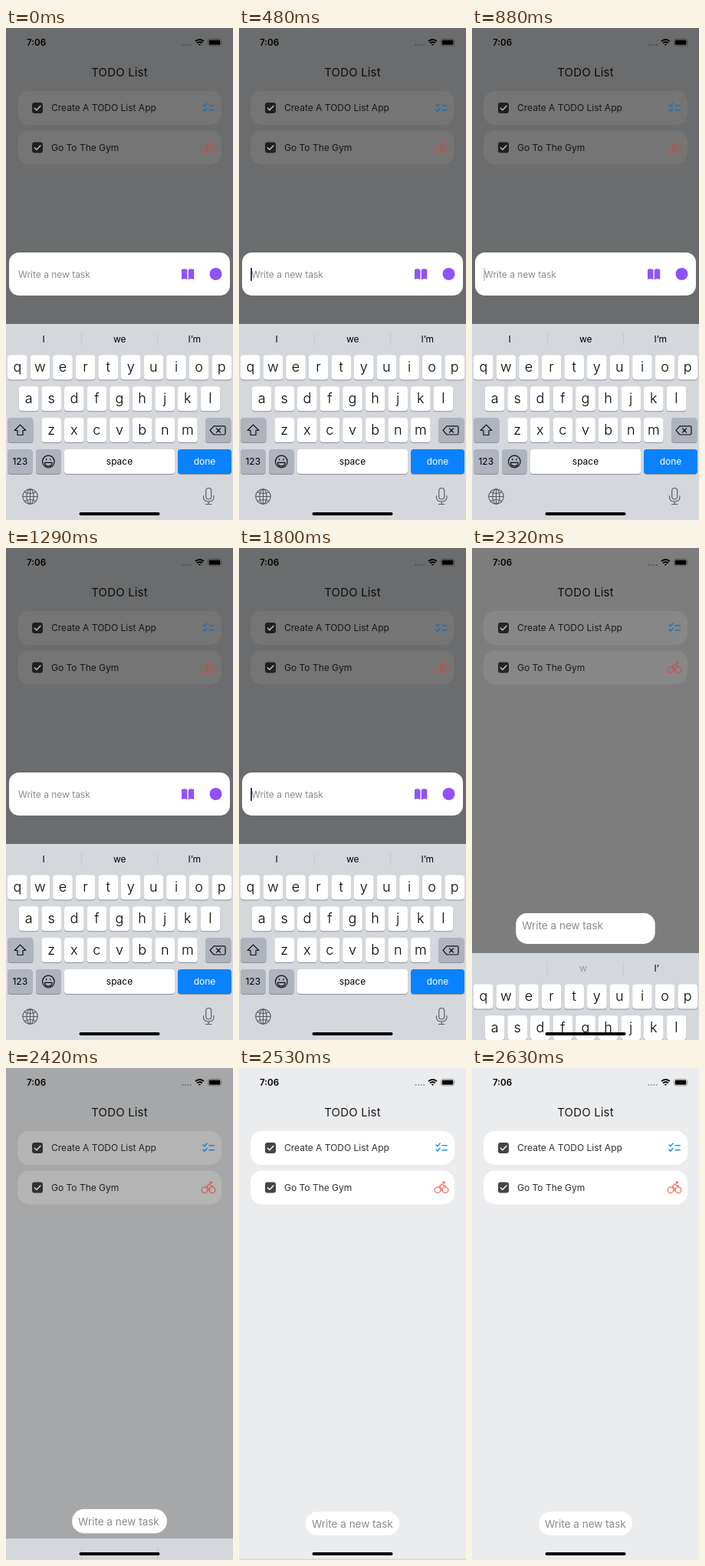
Recreate the animation shown at these times as an HTML page. Size 296 by 640 pixels, loop 2.84 s.

```html
<!DOCTYPE html>
<html lang="en">
<head>
<meta charset="utf-8">
<title>TODO List</title>
<style>
  html, body { margin: 0; width: 100%; height: 100%; overflow: hidden; background: #ebecee; }
  svg { display: block; width: 100%; height: 100%; font-family: Inter, Roboto, sans-serif; }
  .line { fill: none; stroke-linecap: round; stroke-linejoin: round; }
  .middle { text-anchor: middle; }
  .label { font-size: 12px; }
  .letter { font-size: 18px; font-weight: 300; text-anchor: middle; }
</style>
</head>
<body>
<svg viewBox="0 0 296 640">
  <rect width="296" height="640" fill="#ebecee"/>

  <!-- Status bar -->
  <text x="27" y="23" font-size="11.6" font-weight="600">7:06</text>
  <g fill="#000" fill-opacity=".35">
    <circle cx="230.5" cy="22" r="1"/><circle cx="234" cy="22" r="1"/>
    <circle cx="237.5" cy="22" r="1"/><circle cx="241" cy="22" r="1"/>
  </g>
  <g class="line" stroke="#000" stroke-width="1.8" style="stroke-linecap:butt">
    <path d="M247 17.3q5.4-4.6 10.8 0M249 19.6q3.4-2.8 6.8 0"/>
  </g>
  <path d="M250.7 21.3q1.7-1.3 3.4 0l-1.7 1.8z"/>
  <rect x="263.5" y="14.5" width="17" height="8.5" rx="2.4" fill="none" stroke="#000" stroke-opacity=".4" stroke-width=".8"/>
  <rect x="264.8" y="15.8" width="14.4" height="5.9" rx="1.3"/>
  <path d="M281.6 17.2q1.3 1.5 0 3z" fill-opacity=".45"/>

  <!-- Task list -->
  <text class="middle" x="148" y="62.5" font-size="15" letter-spacing=".15" fill="#1c1c1c">TODO List</text>
  <g fill="#fff">
    <rect x="15" y="82" width="266" height="44" rx="15"/>
    <rect x="15" y="133.5" width="266" height="44" rx="15"/>
  </g>
  <g class="label" fill="#303030">
    <text x="59" y="108.3">Create A TODO List App</text>
    <text x="59" y="159.8">Go To The Gym</text>
  </g>
  <g fill="#454547">
    <rect x="34" y="97" width="14" height="14" rx="3.2"/>
    <rect x="34" y="148.5" width="14" height="14" rx="3.2"/>
  </g>

  <rect id="barrier" width="296" height="640"/>

  <g id="icons" class="line">
    <path d="M37.3 104.2l2.6 2.6 5-5.4M37.3 155.7l2.6 2.6 5-5.4" stroke="#fff" stroke-width="1.4"/>
    <path d="M257 100l1.8 1.8 3.2-3.6M257 106.300l1.800 1.800 3.200-3.600M265 100.700h6.200M265 106.800h6.200" stroke="#2196f3" stroke-width="1.6"/>
    <g stroke="#f56e5f" stroke-width="1.3">
      <circle cx="258.900" cy="158.700" r="3.800"/><circle cx="269" cy="158.700" r="3.800"/>
      <path d="M264.200 159.500v-3.300l-2.800-2.200 3.200-3 2.300 2.300h2.800"/>
      <circle cx="267.200" cy="149" r="1.100" fill="#f56e5f"/>
    </g>
  </g>

  <!-- Task entry -->
  <rect id="box" fill="#fff"/>
  <text id="hint" fill="#8a8a8a">Write a new task</text>
  <g id="actions" fill="#9052fa">
    <path d="M229 314.200q4-1.800 7.400.2v13q-3.400-2-7.400-.4zM245.200 314.200q-4-1.800-7.400.2v13q3.400-2 7.400-.4z"/>
    <circle cx="273.500" cy="320" r="8"/>
  </g>
  <rect id="cursor" x="15.300" y="312" width="1.500" height="17"/>

  <g id="keyboard">
    <rect y="385" width="296" height="256" fill="#d4d8dd"/>
    <path d="M98.500 397v16M197.500 397v16" stroke="#c0c4c9" stroke-width=".8"/>
    <g id="suggestions" class="label">
      <text x="47.600" y="409.300">I</text><text x="140" y="409.300">we</text><text x="237.500" y="409.300">I’m</text>
    </g>
    <g id="keys"></g>
    <g class="line" stroke="#111" stroke-width="1.200">
      <path d="M18.500 516.200l-7.300 7.300h3.800v6h7v-6h3.800z"/>
      <path d="M271 517.800h13.200q1.800 0 1.800 1.800v7.600q0 1.800-1.800 1.800H271l-5-5.600zM274.500 521l5 5m0-5l-5 5"/>
      <circle cx="55.300" cy="564" r="7.800"/>
      <path d="M50.300 565.300h10q-.7 4.600-5 4.600t-5-4.600zM52.600 560.500v1.400M58 560.500v1.400"/>
    </g>
    <g class="line" stroke="#565a60" stroke-width="1.100">
      <circle cx="31.500" cy="609.500" r="9.700"/><ellipse cx="31.500" cy="609.500" rx="4.600" ry="9.700"/>
      <path d="M31.500 600v19M22 609.500h19M24 603.500q7.500 4 15 0M24 615.500q7.500-4 15 0"/>
      <rect x="260.700" y="598.500" width="7" height="14.500" rx="3.500"/>
      <path d="M257.500 608.500v2q0 5.500 6.700 5.500t6.700-5.500v-2M264.200 616v3.500M260.500 619.500h7.400"/>
    </g>
  </g>
  <rect x="95.500" y="630" width="105" height="4" rx="2"/>
</svg>
<script>
const $ = id => document.getElementById(id);

// Keyboard layout
function key(x, y, width, label, { fill = '#fff', color = '#000', style = 'label middle', base = 20 } = {}) {
  const rect = (top, color) => `<rect x="${x}" y="${top}" width="${width}" height="32" rx="4" fill="${color}"/>`;
  return rect(y + 1, '#8e9196') + rect(y, fill) +
    `<text class="${style}" x="${x + width / 2}" y="${y + base}" fill="${color}">${label}</text>`;
}
const pitch = 296 / 10, grey = { fill: '#aeb3bd' };
let keys = '';
['qwertyuiop', 'asdfghjkl', 'zxcvbnm'].forEach((row, r) => {
  const indent = [2, pitch / 2 + 2, pitch * 1.5 + 2][r];
  [...row].forEach((char, i) => {
    keys += key(indent + i * pitch, 425.5 + r * 40.8, 25.6, char, { style: 'letter', base: 21.5 });
  });
});
keys += key(2, 507.1, 33.5, '', grey) + key(260, 507.1, 33.5, '', grey) +
  key(2, 548, 32.5, '123', grey) + key(39, 548, 32.5, '', grey) + key(76, 548, 144, 'space') +
  key(224, 548, 70, 'done', { fill: '#0a82ff', color: '#fff' });
$('keys').innerHTML = keys;

// Timing, in ms: the picture is refreshed only at these moments
const LOOP = 2840, CLOSE = 2200;
const refreshes = [0, 260, 370, 480, 780, 880, 980, 1290, 1400, 1500, 1800, 1910, 2010,
  2200, 2320, 2420, 2530, 2630];

const clamp = v => Math.max(0, Math.min(1, v));
const mix = (a, b, p) => a + (b - a) * p;
const settle = (t, scale, power) => 1 - Math.exp(-((t / scale) ** power));
const easeOut = v => 1 - (1 - clamp(v)) ** 2;

function cursorOpacity(t) {
  const phase = (t - 260 + 1030) % 1030;
  return phase < 510 ? easeOut(phase / 230) : 1 - easeOut((phase - 510) / 230);
}

function set(id, attributes) {
  for (const name in attributes) $(id).setAttribute(name, attributes[name]);
}

function draw(time) {
  const t = refreshes.findLast(moment => moment <= time);
  const closing = Math.max(0, t - CLOSE), moving = closing > 0;

  const shade = 0.54 * (1 - clamp(closing / 320) ** 2.1);
  set('barrier', { opacity: shade });
  $('icons').style.filter = `brightness(${1 - 0.45 * shade})`;

  const p = settle(closing, 118.7, 2.44);
  const x = mix(4, 87, p), y = mix(292, 577, p);
  set('box', { x, y, width: mix(288, 122, p), height: mix(56, 31, p), rx: mix(13, 15.5, p) });
  set('hint', moving
    ? { x: x + 8, y: y + 20.7, 'font-size': 13.5 }
    : { x: x + 12, y: y + 32.5, 'font-size': 12 });
  set('actions', { opacity: moving ? 0 : 1 });
  set('cursor', { opacity: moving ? 0 : cursorOpacity(t) });

  set('keyboard', { transform: `translate(0 ${258 * settle(closing, 138, 1.61)})` });
  const words = moving ? ['', 'w', 'I’'] : ['I', 'we', 'I’m'];
  [...$('suggestions').children].forEach((word, i) => { word.textContent = words[i]; });
  set('suggestions', { opacity: closing > 200 ? 0 : 1 });
  $('suggestions').children[1].setAttribute('opacity', moving ? 0.3 : 1);
}

const start = performance.now();
function tick() {
  draw((performance.now() - start) % LOOP);
  requestAnimationFrame(tick);
}
tick();
</script>
</body>
</html>
```
